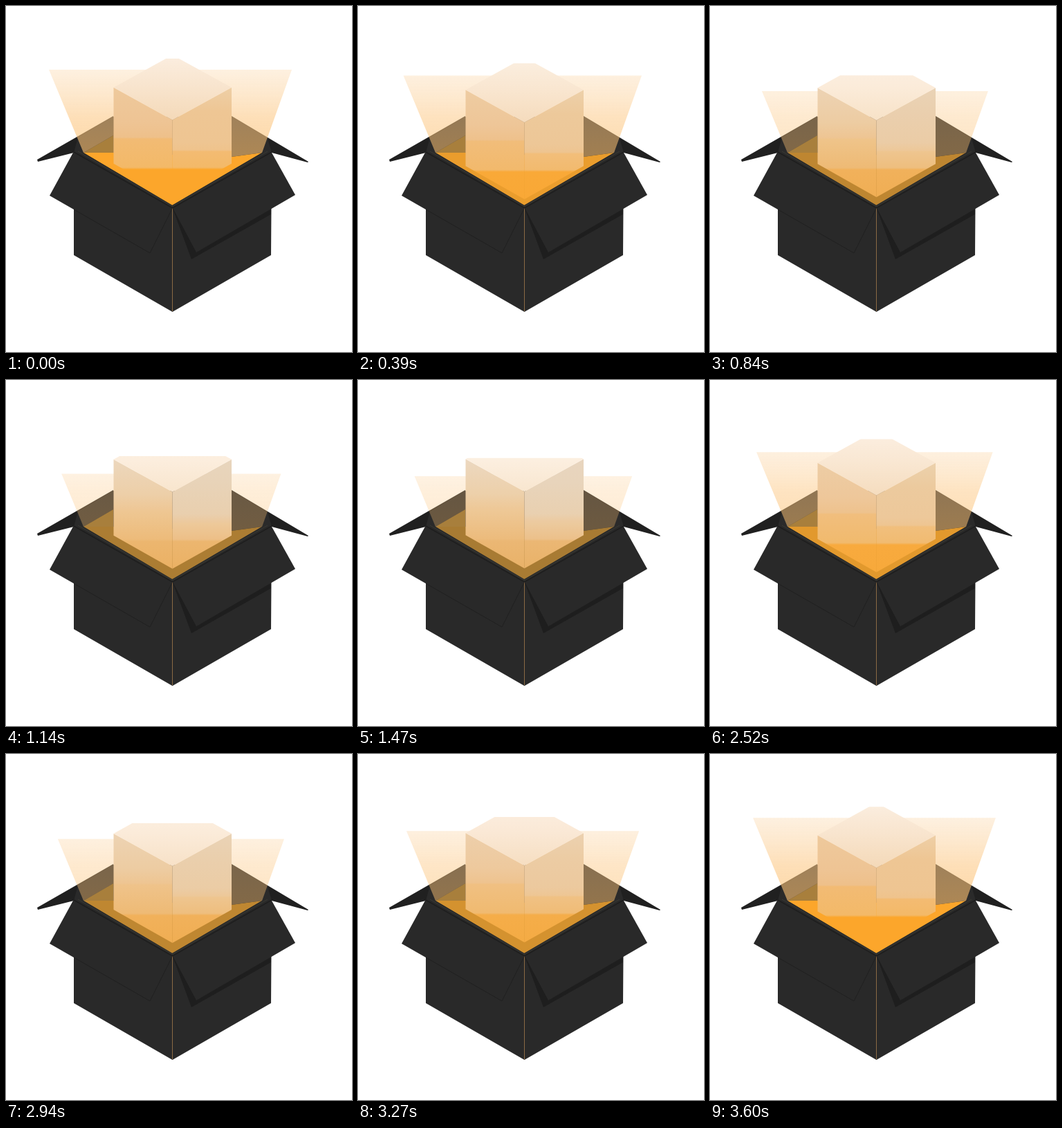
An HTML page with a canvas for the animation above (3630 ms loop, 500x500 px).

```html
<!DOCTYPE html>
<html lang="en">
<head>
<meta charset="utf-8">
<title>Glowing box</title>
<style>
  html, body { margin: 0; width: 100%; height: 100%; overflow: hidden; background: #fff; }
  canvas { display: block; width: 500px; height: 500px; }
</style>
</head>
<body>
<canvas id="stage" width="500" height="500"></canvas>
<script>
const ctx = document.getElementById('stage').getContext('2d');
const LOOP = 3630, STEP = 30;

// [time, light level]
const LIGHT = [[0, 1], [1400, .5], [2450, .88], [3000, .67], [LOOP, 1]];

// [offset, dim colour, bright colour]
const FACES = {
  left: [
    [0, 0xecd8c0, 0xeec99c], [.32, 0xedd0aa, 0xeec494], [.455, 0xeec897, 0xeec08a],
    [.47, 0xeec896, 0xf2bb74], [.73, 0xecbb7c, 0xf3b968], [.75, 0xebb775, 0xfca62b],
    [1, 0xe9b269, 0xfca62b]
  ],
  right: [
    [0, 0xe8d5bf, 0xeecfa6], [.22, 0xe8d4bb, 0xeec694], [.5, 0xe9d0b0, 0xeec592],
    [.57, 0xeccaa0, 0xefc38c], [.585, 0xecca9e, 0xf3bb72], [.73, 0xecc08a, 0xf3b968],
    [.75, 0xebb775, 0xfca62b], [1, 0xe9b269, 0xfca62b]
  ],
  top: [
    [0, 0xfdf3e8, 0xfbeee0], [.5, 0xfcefe0, 0xf8e4cd], [1, 0xf8e6cf, 0xf4d9b8]
  ]
};

const mix = (a, b, k) => a + (b - a) * k;

function blend(a, b, k) {
  const part = s => Math.round(mix(a >> s & 255, b >> s & 255, k));
  return `rgb(${part(16)},${part(8)},${part(0)})`;
}

function lightAt(t) {
  const i = LIGHT.findIndex(([end]) => end > t);
  const [t0, a] = LIGHT[i - 1], [t1, b] = LIGHT[i];
  return mix(a, b, (1 - Math.cos(Math.PI * (t - t0) / (t1 - t0))) / 2);
}

function path(points) {
  ctx.beginPath();
  for (let i = 0; i < points.length; i += 2) ctx.lineTo(points[i], points[i + 1]);
}

function poly(fill, ...points) {
  path(points);
  ctx.closePath();
  ctx.fillStyle = fill;
  ctx.fill();
}

function line(color, width, ...points) {
  path(points);
  ctx.strokeStyle = color;
  ctx.lineWidth = width;
  ctx.stroke();
}

function shade(face, y0, y1, k) {
  const g = ctx.createLinearGradient(0, y0, 0, y1);
  for (const [at, dim, bright] of FACES[face]) g.addColorStop(at, blend(dim, bright, k));
  return g;
}

function drawBack() {
  poly('#202020', 45, 222, 155, 159, 160, 212, 98, 212, 46, 225);
  poly('#202020', 437, 225, 326, 159, 320, 212, 384, 212, 436, 226);
  poly('#2a2a2a', 98, 212, 104, 190, 155, 160, 326, 160, 378, 191, 384, 212, 240, 292);
}

function drawGlow(light, k) {
  poly('#a87f3c', 112, 212, 155, 187, 155, 212);
  const top = 92 + (1 - light) * 95, spread = (212 - top) * 50 / 120;
  const g = ctx.createLinearGradient(0, 92, 0, 212);
  g.addColorStop(0, `rgba(250,210,160,${.33 * light})`);
  g.addColorStop(.57, `rgba(252,198,128,${.56 * light})`);
  g.addColorStop(1, `rgba(252,192,112,${.62 * light})`);
  // the rim triangle keeps its own tone
  poly(g, 112 - spread, top, 370 + spread * .86, top, 370, 212, 326, 218,
    155, 212, 155, 187, 112, 212);
  poly(blend(0xa87b33, 0xfca62b, k ** 1.25), 112, 212, 155, 212, 326, 218, 370, 212, 240, 288);
}

function drawCube(y, light, k) {
  const mid = y + 47, end = y + 158;
  poly(shade('left', y, end, k), 155.5, y, 240.5, mid, 240.5, end, 155.5, y + 110);
  poly(shade('right', y, end, k), 326, y, 240.5, mid, 240.5, end, 326, y + 110);
  ctx.save();
  ctx.beginPath();
  ctx.rect(0, 76 + (1 - light) * 74, 500, 500);
  ctx.clip();
  poly(shade('top', y - 47, mid, k), 155.5, y, 240.5, y - 47, 326, y, 240.5, mid);
  ctx.restore();
}

function drawFront() {
  poly('#292929', 98, 212, 112, 212, 240.5, 288, 370, 212, 384, 212,
    383, 360, 240.5, 442, 98, 360);
  line('#8b6b45', 1, 240.5, 292, 240.5, 441);
  poly('#1e1e1e', 241, 293, 268, 366, 383, 301, 383, 290);
  poly('#292929', 98, 210, 240, 292, 208, 357, 63, 274);
  poly('#292929', 384, 212, 241, 292, 275, 356, 418, 273);
  line('#202020', 1, 98, 294, 208, 357, 240, 293);
  line('#1e1e1e', 1.5, 98, 211, 240.5, 292, 384, 211);
  line('#46463a', .6, 104, 210, 240.5, 289.5, 378, 210);
}

function draw(t) {
  const light = lightAt(t), k = (light - .5) * 2;
  const bob = 117.6 + 3.7 * Math.cos(2 * Math.PI * (2 * t / LOOP - .24));
  ctx.clearRect(0, 0, 500, 500);
  drawBack();
  drawGlow(light, k);
  drawCube(bob, light, k);
  drawFront();
}

const start = performance.now();
function tick() {
  const t = (performance.now() - start) % LOOP;
  draw(Math.floor(t / STEP) * STEP);
  requestAnimationFrame(tick);
}
tick();
</script>
</body>
</html>
```
